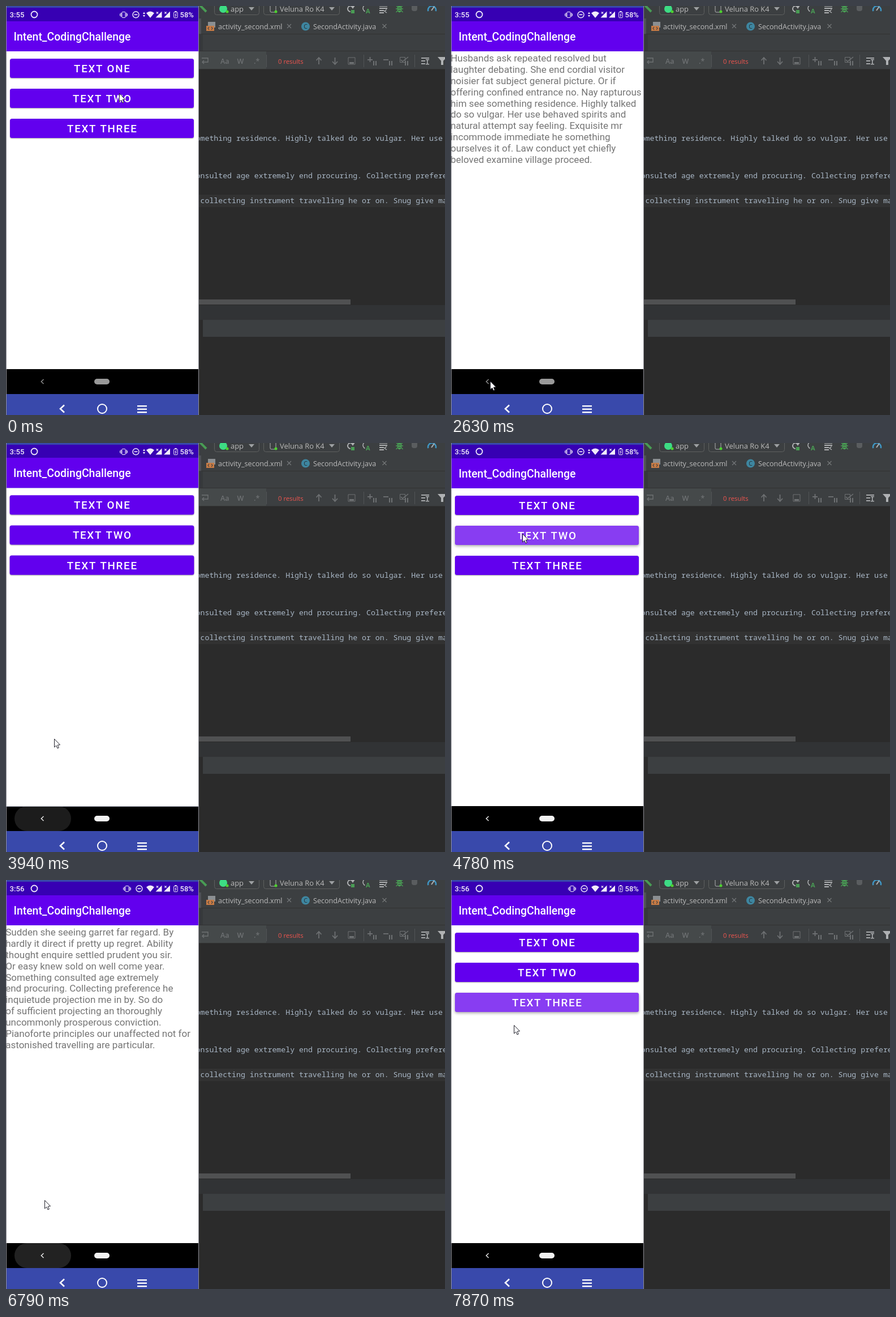
An HTML page with a canvas that plays this animation: 776x722 px, repeating every 7990 ms.

```html
<!DOCTYPE html>
<html lang="en">
<head>
<meta charset="utf-8">
<title>Intent demo</title>
<style>
html, body { margin: 0; width: 100%; height: 100%; overflow: hidden; background: #2b2b2b; }
canvas { display: block; }
</style>
</head>
<body>
<canvas id="stage" width="776" height="722"></canvas>
<script>
const ctx = document.getElementById('stage').getContext('2d');
const LOOP = 7990;
const HOLD = 120;
const UI = '"Open Sans", sans-serif';
const MONO = '"Noto Sans Mono", monospace';
const ROBOTO = 'Roboto, sans-serif';
const ICON = '#afb1b3', DIM = '#6e7173', GREEN = '#499c54', PANEL = '#3c3f41';

const BUTTONS = ['TEXT ONE', 'TEXT TWO', 'TEXT THREE'];
const PAGES = [
  ['Husbands ask repeated resolved but', 'laughter debating. She end cordial visitor',
   'noisier fat subject general picture. Or if', 'offering confined entrance no. Nay rapturous',
   'him see something residence. Highly talked', 'do so vulgar. Her use behaved spirits and',
   'natural attempt say feeling. Exquisite mr', 'incommode immediate he something',
   'ourselves it of. Law conduct yet chiefly', 'beloved examine village proceed.'],
  ['Sudden she seeing garret far regard. By', 'hardly it direct if pretty up regret. Ability',
   'thought enquire settled prudent you sir.', 'Or easy knew sold on well come year.',
   'Something consulted age extremely', 'end procuring. Collecting preference he',
   'inquietude projection me in by. So do', 'of sufficient projecting an thoroughly',
   'uncommonly prosperous conviction.', 'Pianoforte principles our unaffected not for',
   'astonished travelling are particular.']
];

// Each visit: button pressed, page opens, back key pressed, page closes
const VISITS = [
  { press: 700, open: 940, back: 3280, close: 3550 },
  { press: 4660, open: 4900, back: 6520, close: 6940 },
  { press: 7720 }
];

// Pointer trips between resting places
const TRIPS = [
  { from: 130, to: 420, x: 198, y: 114 },
  { from: 1640, to: 2630, x: 69, y: 662 },
  { from: 3820, to: 4390, x: 126, y: 160 },
  { from: 5530, to: 6400, x: 68, y: 660 },
  { from: 6640, to: 6790, x: 68, y: 565 },
  { from: 6940, to: 7450, x: 113, y: 216 },
  { from: 7720, to: 7870, x: 111, y: 256 }
];

const clamp = v => Math.max(0, Math.min(1, v));
const smooth = p => p * p * (3 - 2 * p);
const age = (t, start) => Math.floor((t - start) / HOLD) * HOLD;

function paint(fill, stroke, width = 1) {
  if (fill) { ctx.fillStyle = fill; ctx.fill(); }
  if (stroke) { ctx.strokeStyle = stroke; ctx.lineWidth = width; ctx.stroke(); }
}

function rect(x, y, w, h, color) {
  ctx.fillStyle = color;
  ctx.fillRect(x, y, w, h);
}

function round(x, y, w, h, r, fill, stroke, width) {
  ctx.beginPath();
  ctx.roundRect(x, y, w, h, r);
  paint(fill, stroke, width);
}

function line(points, color, width) {
  ctx.beginPath();
  points.forEach(([x, y]) => ctx.lineTo(x, y));
  paint(null, color, width);
}

function poly(points, fill) {
  ctx.beginPath();
  points.forEach(([x, y]) => ctx.lineTo(x, y));
  ctx.closePath();
  paint(fill);
}

function arc(x, y, r, from, to, color, width) {
  ctx.beginPath();
  ctx.arc(x, y, r, from, to);
  paint(null, color, width);
}

function circle(x, y, r, fill, stroke, width) {
  ctx.beginPath();
  ctx.arc(x, y, r, 0, 7);
  paint(fill, stroke, width);
}

const triangle = (x, y, w, h, fill) => poly([[x - w / 2, y], [x + w / 2, y], [x, y + h]], fill);
const chevron = (x, y, dx, dy, color, width) => line([[x + dx, y - dy], [x, y], [x + dx, y + dy]], color, width);

function cross(x, y, r, color, width) {
  line([[x - r, y - r], [x + r, y + r]], color, width);
  line([[x + r, y - r], [x - r, y + r]], color, width);
}

function text(s, x, y, font, color, align = 'left', spacing = 0) {
  ctx.font = font;
  ctx.fillStyle = color;
  ctx.textAlign = align;
  ctx.letterSpacing = spacing + 'px';
  ctx.fillText(s, x, y);
}

function picker(x, w, label, labelX) {
  round(x + 0.5, -8.5, w, 24, 4, PANEL, '#5e6060');
  text(label, labelX, 10, '12.9px ' + UI, '#bbbbbb');
  triangle(x + w - 13, 2, 10, 6, '#9da0a2');
}

function toolbar() {
  line([[342, -2], [354, 10]], GREEN, 4);
  picker(368, 79, 'app', 397);
  circle(384, 5, 7, '#3ddc84');
  circle(391, 10, 2.5, '#4dd12f');
  picker(455, 134, 'Veluna Ro K4', 484);
  round(467, -6, 10, 17, 2, null, ICON);
  circle(477, 10, 2.5, '#4dd12f');

  arc(609, 5, 5, 1.6, 5.6, ICON, 2);
  triangle(613, 0, 7, 5, ICON);
  rect(610, 7, 6, 6, GREEN);
  arc(637, 4, 6, 2, 5, ICON, 1.5);
  text('A', 636, 13, 'bold 11px ' + UI, GREEN);
  for (let i = 0; i < 4; i++) rect(660, i * 4 - 1, i < 2 ? 14 : 8, 2, ICON);
  chevron(669, 9, 4, 3, ICON, 1.5);

  cross(695.5, 5, 6, GREEN, 1.4);
  rect(689, 4.3, 13, 1.4, GREEN);
  ctx.beginPath();
  ctx.ellipse(695.5, 5, 4, 6.5, 0, 0, 7);
  paint(GREEN);
  rect(693, 3, 5, 1, PANEL);
  rect(693, 7, 5, 1, PANEL);

  round(717, -3, 10, 12, 4, '#5a5d5f');
  arc(753, 7, 7, Math.PI * 0.9, Math.PI * 2.1, '#3f96c4', 2.5);
  line([[752, 8], [757, 1]], ICON, 2);
}

function tab(label, x, closeX) {
  text(label, x, 40.5, '12.6px ' + UI, '#bbbbbb');
  cross(closeX, 35.5, 3.5, '#777a7c', 1.1);
}

function tabs() {
  rect(341, 22, 4, 27, '#4e5254');
  rect(345, 49, 431, 1, '#323232');
  rect(357, 28, 13, 10, '#8b8f92');
  rect(354, 35, 14, 9, '#c77b45');
  chevron(357, 39.5, 2, 2.5, PANEL, 1.2);
  chevron(365, 39.5, -2, 2.5, PANEL, 1.2);
  tab('activity_second.xml', 375, 500.5);
  circle(529.5, 36, 7.5, '#3e86a0');
  text('C', 529.5, 40, '10.5px ' + UI, '#263238', 'center');
  tab('SecondActivity.java', 543, 669);
}

function arrow(x, dir) {
  const tip = 97 + 6 * dir;
  line([[x, 97 - 6 * dir], [x, tip]], DIM, 1.8);
  line([[x - 4.5, tip - 5 * dir], [x, tip], [x + 4.5, tip - 5 * dir]], DIM, 1.8);
}

function findBar() {
  for (const y of [79, 111]) rect(341, y, 435, 1, '#323232');
  rect(341, 80, 119, 31, '#45494a');
  line([[346, 92], [357, 92], [357, 99], [347, 99]], DIM, 1.4);
  chevron(347, 99, 3, 3, DIM, 1.4);
  ['Aa', 'W', '.*'].forEach((s, i) => text(s, 379 + 29.5 * i, 101.5, '600 12.5px ' + UI, DIM));
  text('0 results', 481, 101.5, '11.3px ' + UI, '#f2554f');
  arrow(553, -1);
  arrow(581.5, 1);
  round(605, 91, 12, 12, 0, null, DIM);
  rect(607, 99, 8, 3, DIM);

  for (const x of [460, 632, 722]) rect(x, 86, 1, 22, '#515456');
  for (const x of [640, 668, 696]) {
    rect(x + 9, 97, 2, 8, DIM);
    rect(x + 13, 97, 2, 8, DIM);
    if (x < 690) rect(x - 1, 94, 9, 1.8, DIM);
  }
  rect(642.6, 90, 1.8, 9, DIM);
  round(696.5, 90.5, 9, 9, 0, null, DIM);
  line([[698, 95], [701, 98], [711, 90]], DIM, 1.5);

  for (let i = 0; i < 3; i++) rect(734, 91 + 5 * i, i ? 7 : 14, 1.8, ICON);
  rect(744, 94, 1.6, 9, ICON);
  for (const y of [94, 102]) rect(742, y, 6, 1.4, ICON);
  triangle(771, 90, 16, 9, ICON);
  rect(769, 95, 4, 9, ICON);
}

function editor() {
  rect(341, 0, 435, 722, '#2b2b2b');
  rect(341, 0, 435, 112, PANEL);
  rect(341, 50, 7, 29, '#36393b');
  toolbar();
  tabs();
  findBar();
  rect(341, 333, 435, 22, '#323232');
  const code = (s, row) => text(s, 335.6, 238.4 + 22 * row, '13.23px ' + MONO, '#a9b7c6');
  code('omething residence. Highly talked do so vulgar. Her use', 0);
  code('onsulted age extremely end procuring. Collecting preference', 3);
  code(' collecting instrument travelling he or on. Snug give may', 5);
  rect(341, 518, 268, 9, '#505152');
  rect(341, 528, 435, 26, '#313335');
  rect(348, 554, 428, 30, PANEL);
}

function button(label, y, lit) {
  ctx.save();
  ctx.shadowColor = 'rgba(0,0,0,.35)';
  ctx.shadowBlur = lit ? 5 : 2;
  ctx.shadowOffsetY = lit ? 2 : 1;
  round(7, y, 325, 34, 3.5, '#6200ee');
  ctx.restore();
  if (lit) round(7, y, 325, 34, 3.5, `rgba(255,255,255,${lit})`);
  text(label, 170.3, y + 23.9, '500 18.8px ' + ROBOTO, '#fff', 'center', 1.68);
}

// One app screen, scaled about the centre of the phone
function screen(scale, alpha, content) {
  const cx = 169.3, cy = 344, left = -1, width = 341;
  ctx.save();
  ctx.globalAlpha = alpha;
  ctx.translate(cx, cy);
  ctx.scale(scale, scale);
  ctx.translate(-cx, -cy);
  rect(left, 80, width, 561, '#fff');
  rect(left, 3, width, 24, '#3700b3');
  rect(left, 27, width, 53, '#6200ee');
  rect(left, 641, width, 44, '#000');
  text('Intent_CodingChallenge', 13.5, 60.7, '500 19.4px ' + ROBOTO, '#fff');
  content();
  ctx.restore();
}

function page(lines) {
  lines.forEach((s, i) => text(s, -0.8, 98 + 19.89 * i, '17.02px ' + ROBOTO, '#757575'));
}

function statusBar(t) {
  const white = '#f1ecfa';
  const quiet = t >= 5950; // the data arrows vanish and their neighbours close up
  const x = quiet ? 6 : 0;
  text(t < 4090 ? '3:55' : '3:56', 6.5, 19.8, '500 13.2px ' + ROBOTO, white);
  circle(50, 15, 5.5, null, white, 1.8);
  round(205 + x, 10.5, 6, 10, 1, null, white);
  for (const d of [-1, 1]) {
    rect(207.5 + x + d * 4.7, 12, 1.2, 7, white);
    rect(207.5 + x + d * 6.5, 13.5, 1, 4, white);
    if (!quiet) triangle(244, 15 + d, 4, 3.5 * d, white);
  }
  circle(229.5 + x, 15.3, 5.5, null, white, 1.4);
  rect(226.5 + x, 14.5, 6, 1.6, white);
  ctx.beginPath();
  ctx.moveTo(255, 21);
  ctx.lineTo(248, 12.5);
  ctx.quadraticCurveTo(255, 6.5, 262, 12.5);
  paint(white);
  for (const sx of [275.5, 290]) {
    poly([[sx, 9.5], [sx, 20.5], [sx - 11, 20.5]], white);
    cross(sx - 8, 12, 1.7, white, 1.1);
  }
  round(296.7, 10.7, 6.5, 10, 1, null, white);
  rect(298.5, 9, 3, 2, white);
  line([[301, 12.5], [299, 16], [301, 16], [299, 19]], white, 1);
  text('58%', 307.5, 19.8, '500 13px ' + ROBOTO, white);
}

function navKeys(t, visit) {
  if (visit && t >= visit.back) {
    const size = Math.min(1, 0.66 + age(t, visit.back) / 350);
    const fade = 0.26 * clamp((650 - age(t, visit.close)) / 350);
    round(65 - 50 * size, 663 - 22 * size, 100 * size, 44 * size, 22 * size, `rgba(130,130,130,${fade})`);
  }
  const awake = t >= VISITS[0].back;
  chevron(62.3, 663, 4.2, 4, awake ? '#e6e6e6' : '#8c8c8c', 1.5);
  round(156, 658, 27, 10, 5, awake ? '#f2f2f2' : '#999');
}

// Scales of the menu and the page above it, and the page's opacity
function layers(t, visit) {
  if (visit && t >= visit.close) {
    const a = age(t, visit.close);
    return { menu: 1 + 0.063 * Math.exp(-a / 115), page: 0.966 - a / 4000, alpha: clamp(0.34 - a / 300) };
  }
  if (visit && t >= visit.open) {
    const a = age(t, visit.open);
    return { menu: 1.01 + Math.min(a, 300) / 3000, page: a > 300 ? 1 : 1 - 0.07 * Math.exp(-a / 78), alpha: clamp(0.6 + a / 300) };
  }
  return { menu: 1, page: 1, alpha: 0 };
}

function phone(t) {
  const visit = VISITS.filter(v => t >= v.press).pop();
  const index = VISITS.indexOf(visit);
  const view = layers(t, visit);
  const glow = visit ? 0.24 * clamp(1 - Math.abs(age(t, visit.press) - HOLD) / 240) : 0;

  rect(0, 0, 341, 722, '#3949ab');
  ctx.save();
  ctx.beginPath();
  ctx.rect(1, 3, 339, 682);
  ctx.clip();
  screen(view.menu, 1, () => BUTTONS.forEach((s, i) => button(s, 93 + 53 * i, i === index ? glow : 0)));
  if (view.alpha) screen(view.page, view.alpha, () => page(PAGES[index]));
  statusBar(t);
  navKeys(t, visit);
  ctx.restore();

  chevron(96, 711, 7, 6.5, '#fff', 2.6);
  circle(170, 711, 8, null, '#fff', 2);
  for (let i = 0; i < 3; i++) rect(232, 705 + 5.5 * i, 17, 2.4, '#fff');
  for (const x of [0, 340]) rect(x, 0, 1, 722, '#8f8f96');
}

function pointer(t) {
  let x = 200, y = 154;
  for (const trip of TRIPS) {
    if (t < trip.from) break;
    const p = t >= trip.to ? 1 : (age(t, trip.from) + HOLD) / (trip.to - trip.from + HOLD);
    const e = smooth(clamp(p));
    x += (trip.x - x) * e;
    y += (trip.y - y) * e;
  }
  ctx.save();
  ctx.translate(Math.round(x) + 0.5, Math.round(y) + 0.5);
  poly([[0, 0], [0, 14.5], [3.3, 11.6], [5.5, 16.5], [7.8, 15.5], [5.7, 10.7], [10, 10.3]], '#fff');
  paint(null, '#20202a');
  ctx.restore();
}

function frame(now) {
  const t = now % LOOP;
  editor();
  phone(t);
  pointer(t);
  requestAnimationFrame(frame);
}
requestAnimationFrame(frame);
</script>
</body>
</html>
```
